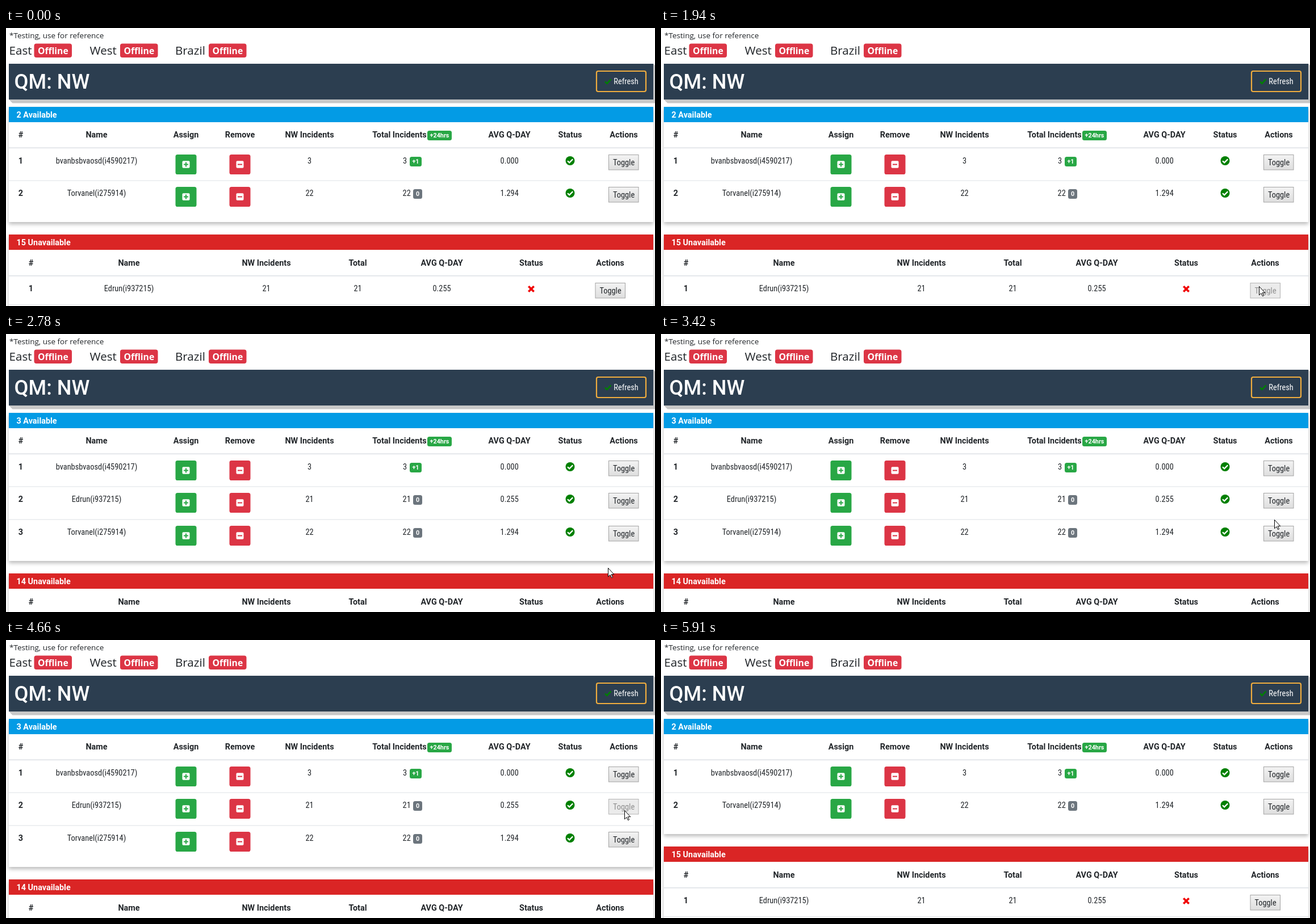
An HTML page for the animation above (6.68 s loop, 1143 by 490 pixels).

```html
<!DOCTYPE html>
<html lang="en">
<head>
<meta charset="utf-8">
<title>Queue board</title>
<style>
html, body { margin: 0; width: 100%; height: 100%; overflow: hidden; background: #fff; }
svg { display: block; width: 1143px; height: 490px; }
text { font: 14.4px Roboto, sans-serif; fill: #212529; text-anchor: middle; white-space: pre; }
.b { font-weight: 700; }
.l { text-anchor: start; }
.e { text-anchor: end; }
.w { fill: #fff; }
.n { font-family: "Roboto Condensed", Roboto, sans-serif; font-stretch: 75%; }
.s { font: 700 10.8px Roboto, sans-serif; fill: #fff; }
.note { font: 13.5px "Open Sans", "Noto Sans", sans-serif; }
.site { font: 500 20.6px "Open Sans", "Noto Sans", sans-serif; }
.off { font: 700 15.7px "Open Sans", "Noto Sans", sans-serif; fill: #fff; }
.title { font: 500 36.2px Roboto, sans-serif; fill: #fff; }
.card { fill: #fff; filter: drop-shadow(0 4px 3px rgba(0, 0, 0, .25)); }
.btn rect { fill: url(#face); stroke: #a3a3a3; }
.btn.hover rect { fill: url(#lit); stroke: #999; }
.btn.press rect { fill: #dcdcdc; stroke: #8c8c8c; }
.btn.idle rect { fill: #ebebeb; stroke: #b4b4b4; }
.btn.idle text { fill: #8e8e8e; }
</style>
</head>
<body>
<svg id="stage" viewBox="0 0 1143 490" xmlns="http://www.w3.org/2000/svg">
  <defs>
    <linearGradient id="face" x2="0" y2="1"><stop stop-color="#f3f3f3"/><stop offset="1" stop-color="#dedede"/></linearGradient>
    <linearGradient id="lit" x2="0" y2="1"><stop stop-color="#f8f8f8"/><stop offset="1" stop-color="#e4e4e4"/></linearGradient>
  </defs>
</svg>
<script>
const GREEN = '#28a745', RED = '#dc3545', GREY = '#6c757d';
const LOOP = 6680, PITCH = 57.75;
const stage = document.getElementById('stage');
const add = html => stage.insertAdjacentHTML('beforeend', html);

// Narrow the regular face once if no condensed cut is available.
add('<text class="n" id="probe">0000000000</text>');
const probe = document.getElementById('probe');
const narrow = probe.getComputedTextLength() > 76 ? 0.906 : 1;
probe.remove();

const rect = (x, y, w, h, fill, r = 0) =>
  `<rect x="${x}" y="${y}" width="${w}" height="${h}" rx="${r}" fill="${fill}"/>`;
const text = (x, y, s, cls = '') => `<text x="${x}" y="${y}" class="${cls}">${s}</text>`;
const cond = (x, y, s, cls = '') =>
  `<text class="n ${cls}" transform="translate(${x} ${y}) scale(${narrow} 1)">${s}</text>`;
const line = (x, y, w, h, c) => rect(x, y, w, h, c);
const badge = (x, y, w, s, fill) => rect(x, y, w, 17, fill, 3.5) + text(x + w / 2, y + 12.4, s, 's');

function button(x, y, id) {
  return `<g class="btn" data-id="${id}" data-x="${x}" data-y="${y}">
    <rect x="${x + .5}" y="${y + .5}" width="52.5" height="26.5"/>${cond(x + 27, y + 19, 'Toggle')}</g>`;
}

function square(x, y, fill, plus) {
  const cx = x + 18.5, cy = y + 17.5;
  return rect(x, y, 37, 35, fill, 3.6) + rect(cx - 6.5, cy - 6.3, 13, 12.6, '#fff', 1.8)
    + `<path d="M${cx - 4} ${cy}h8${plus ? `M${cx} ${cy - 4}v8` : ''}" stroke="${fill}" stroke-width="2"/>`;
}

const tick = (x, y) => `<circle cx="${x}" cy="${y}" r="8" fill="#008000"/>
  <path d="M${x - 4.5} ${y + .2}l3.2 3.2 6-6.2" fill="none" stroke="#fff" stroke-width="2.3"/>`;
const cross = (x, y) =>
  `<path d="M${x - 4.7} ${y - 4.7}l9.4 9.4m0-9.4l-9.4 9.4" stroke="#f00000" stroke-width="3.6"/>`;

function heads(y, xs, labels) {
  return labels.map((s, i) => text(xs[i], y, s, 'b')).join('');
}

const people = [
  { name: 'bvanbsbvaosd(i4590217)', count: 3, avg: '0.000', gain: '+1' },
  { name: 'Edrun(i937215)', count: 21, avg: '0.255', gain: '0' },
  { name: 'Torvanel(i275914)', count: 22, avg: '1.294', gain: '0' }
];

function openRow(p, i) {
  const y = Math.round(211.5 + i * PITCH), base = y + 27, one = p.gain === '+1';
  return (i ? line(5, y - .5, 1135, 1, '#dee2e6') : '')
    + text(26, base, i + 1, 'b') + cond(159.5, base, p.name)
    + square(298.5, y + 11, GREEN, true) + square(393.5, y + 11, RED, false)
    + cond(534.5, base, p.count) + cond(one ? 706 : 712.8, base, p.count, 'e')
    + badge(one ? 711 : 717, y + 15, one ? 21 : 16, p.gain, one ? GREEN : GREY)
    + cond(886.7, base, p.avg) + tick(993.5, y + 22) + button(1061, y + 11, 'open' + i);
}

function board(id, open, away) {
  const low = 364 + (open.length - 2) * 58;
  const cols = [44, 216.5, 458.5, 619.5, 767.5, 925, 1064];
  let s = `<g id="${id}"><rect class="card" x="5" y="139" width="1135" height="${low - 161}"/>`
    + rect(5, 139, 1135, 27, '#039be5') + text(18.5, 157.7, open.length + ' Available', 'b w l')
    + heads(193.3, [26, 159.5, 317, 412, 534.5, 693, 886.5, 993.5, 1088],
      ['#', 'Name', 'Assign', 'Remove', 'NW Incidents', 'Total Incidents', 'AVG Q-DAY', 'Status', 'Actions'])
    + badge(742, 181, 43, '+24hrs', GREEN) + line(5, 210.5, 1135, 1.6, '#dee2e6')
    + open.map(openRow).join('')
    + `<rect class="card" x="5" y="${low}" width="1135" height="200"/>`
    + rect(5, low, 1135, 27, '#da2525') + text(18.5, low + 18.7, 17 - open.length + ' Unavailable', 'b w l')
    + heads(low + 54.7, cols, ['#', 'Name', 'NW Incidents', 'Total', 'AVG Q-DAY', 'Status', 'Actions'])
    + line(5, low + 72, 1135, 1.6, '#dee2e6');
  if (away) {
    const y = low + 100.3;
    s += text(cols[0], y, 1, 'b') + cond(cols[1], y, away.name) + cond(cols[2], y, away.count)
      + cond(cols[3], y, away.count) + cond(cols[4], y, away.avg) + cross(cols[5], 460)
      + button(1037.5, 449, 'away') + line(5, 487, 1135, 1, '#dee2e6');
  }
  return s + '</g>';
}

const site = (x, name, bx) => text(x, 46.6, name, 'site l')
  + rect(bx, 27.5, 66.5, 24.5, RED, 4) + text(bx + 33.3, 46.4, 'Offline', 'off');

add(text(6, 18, '*Testing, use for reference', 'note l')
  + site(5.5, 'East', 49.5) + site(147.5, 'West', 201) + site(298, 'Brazil', 357)
  + '<path d="M5 126l6.5 6.5H1146V69l-6-6z" fill="#c8c8c8"/>'
  + rect(5, 63, 1135, 63, '#2c3e50') + text(14.5, 107, 'QM: NW', 'title l')
  + '<rect x="1040" y="76" width="87" height="36" rx="3" fill="none" stroke="#f0ad3e" stroke-width="2.2"/>'
  + '<path d="M1055 94.3l3.4 3.5 7-7.4" fill="none" stroke="#008000" stroke-width="2.6"/>'
  + cond(1092, 99, 'Refresh', 'w')
  + board('two', [people[0], people[2]], people[1])
  + board('three', people)
  + `<path id="arrow" d="M.5 .5V15.8l3.5-3.3 2.5 5.2 2.1-1-2.5-5H10.8Z" fill="#fff" stroke="#000" stroke-linejoin="round"/>`);

const two = document.getElementById('two'), three = document.getElementById('three');
const arrow = document.getElementById('arrow');
const buttons = [...document.querySelectorAll('.btn')];

// Pointer moves: first step, last step, step count, target x and y, easing.
const out = u => 1 - (1 - u) ** 1.5, soft = u => u * u * (3 - 2 * u), build = u => u ** 1.2, even = u => u;
const moves = [
  [300, 920, 9, 1055, 385, out],
  [990, 1160, 3, 1055, 374, even],
  [1310, 1700, 6, 1053, 455, soft],
  [2400, 3020, 9, 1068, 368, build],
  [3100, 3710, 9, 1085, 310, out],
  [3790, 4030, 4, 1089, 300, even],
  [5130, 5740, 9, 1070, 467, build],
  [5820, 5910, 2, 1068, 503, even]
];

function pointer(t) {
  let x = 1062, y = 497;
  for (const [a, b, n, tx, ty, ease] of moves) {
    if (t < a) break;
    const step = Math.min(n, Math.floor((t - a) / (b - a) * (n - 1) + 1e-6) + 1);
    const u = ease(step / n);
    x += (tx - x) * u;
    y += (ty - y) * u;
  }
  return [Math.round(x), Math.round(y)];
}

const within = (t, a, b) => t >= a && t < b;

function draw(t) {
  const [x, y] = pointer(t), more = within(t, 2170, 4900);
  two.style.display = more ? 'none' : '';
  three.style.display = more ? '' : 'none';
  arrow.style.display = within(t, 300, 5910) ? '' : 'none';
  arrow.setAttribute('transform', `translate(${x} ${y})`);
  const idle = within(t, 1940, 2170) || within(t, 4660, 4900);
  const press = within(t, 1770, 1940) || within(t, 4490, 4660);
  for (const b of buttons) {
    const dx = x - b.dataset.x, dy = y - b.dataset.y;
    const over = dx >= 0 && dx < 53 && dy >= 0 && dy < 27;
    b.setAttribute('class', 'btn' + (!over ? '' : idle ? ' idle' : press ? ' press' : ' hover'));
  }
}

const start = performance.now();
function tickFrame() {
  draw((performance.now() - start) % LOOP);
  requestAnimationFrame(tickFrame);
}
tickFrame();
</script>
</body>
</html>
```
